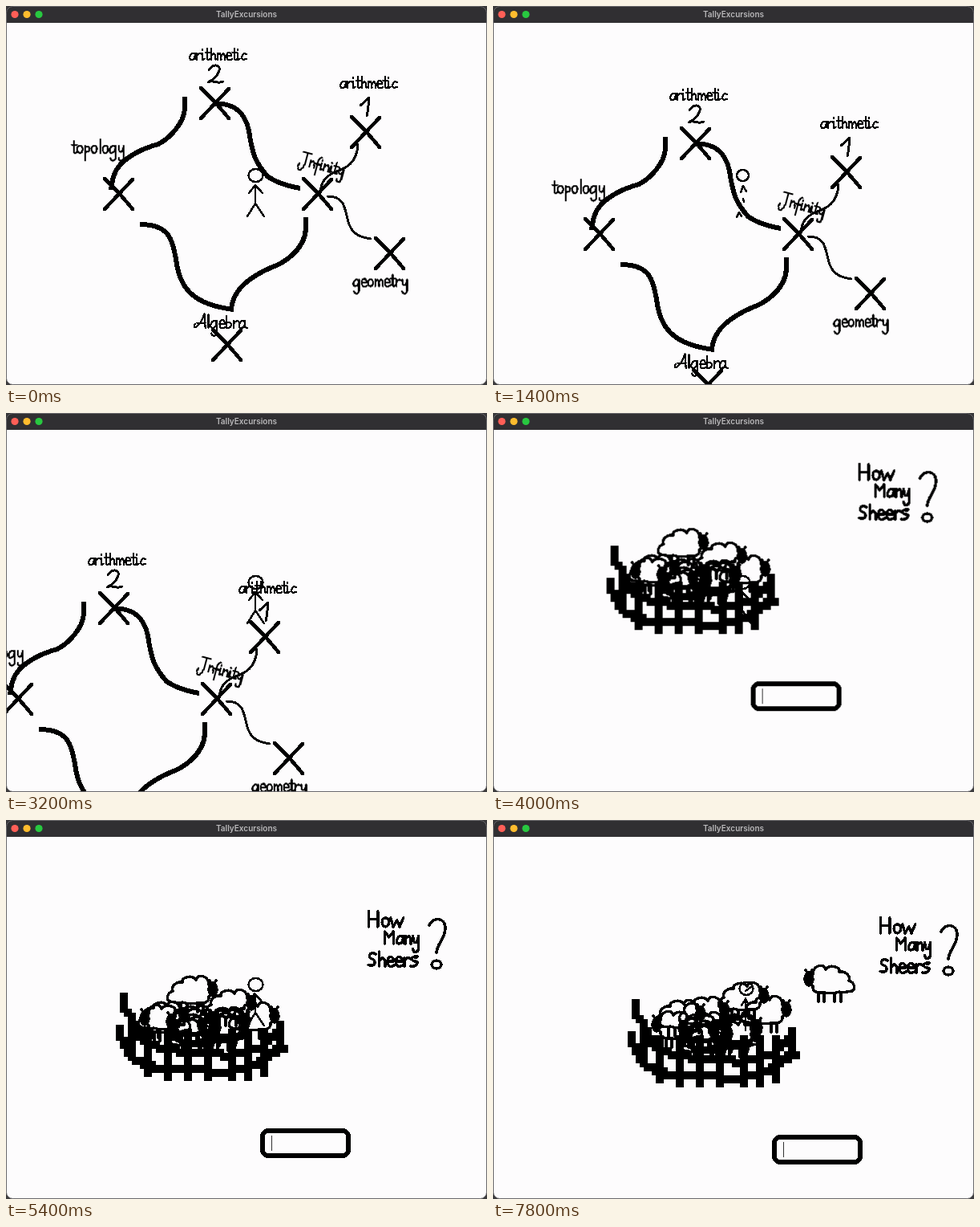
Write an HTML page that moves like this. It is 600 by 472 pixels and loops after 8000 ms.

```html
<!DOCTYPE html>
<html lang="en">
<head>
<meta charset="utf-8">
<title>TallyExcursions</title>
<style>
html, body { margin: 0; width: 100%; height: 100%; overflow: hidden; background: #3b3a3c; }
svg { display: block; width: 100%; height: 100%; }
.ink { fill: none; stroke: #000; stroke-linecap: round; stroke-linejoin: round; shape-rendering: crispEdges; }
.bar { font: 600 10px Inter, "Open Sans", sans-serif; fill: #b9b8ba; text-anchor: middle; }
.anim { animation: 8s step-end infinite; }
#map { animation-name: mapMove; }
#farm { animation-name: farmMove; }
#mapScene { animation-name: early; }
#farmScene { animation-name: late; }
#stand { animation-name: stand; }
#walk { animation-name: walk; }
#side { animation-name: side; }
#herdA { animation-name: herdA; }
#herdB { animation-name: herdB; }
#stray { animation-name: stray; }

@keyframes mapMove {
  0% { transform: translate(0, 0); animation-timing-function: steps(7); }
  17.5% { transform: translate(-8px, 50px); animation-timing-function: steps(2); }
  22.5% { transform: translate(9px, 75px); animation-timing-function: steps(5); }
  35% { transform: translate(-126px, 122px); }
  40% { transform: translate(-126px, 122px); animation-timing-function: steps(3); }
  47.5%, 100% { transform: translate(-126px, 95px); }
}
@keyframes farmMove {
  0%, 47.5% { transform: translate(2px, -6px); animation-timing-function: steps(5); }
  57.5% { transform: translate(0, 0); }
  60% { transform: translate(0, 0); }
  62.5% { transform: translate(28px, 15px); animation-timing-function: steps(2); }
  67.5% { transform: translate(-3px, 45px); }
  70% { transform: translate(-16px, 45px); animation-timing-function: steps(2); }
  75% { transform: translate(-3px, 45px); animation-timing-function: steps(3); }
  82.5% { transform: translate(-78px, 67px); animation-timing-function: steps(3); }
  90% { transform: translate(-47px, 88px); animation-timing-function: steps(3); }
  97.5%, 100% { transform: translate(28px, 53px); }
}
@keyframes early { 0% { visibility: visible; } 47.5%, 100% { visibility: hidden; } }
@keyframes late { 0% { visibility: hidden; } 47.5%, 100% { visibility: visible; } }
@keyframes stand {
  0% { opacity: 1; }
  12.5% { opacity: 0; }
  22.5% { opacity: 1; transform: none; }
  62.5% { opacity: 1; transform: translateY(-6px); }
  77.5%, 100% { opacity: 0; }
}
@keyframes walk { 0% { opacity: 0; } 12.5% { opacity: 1; } 22.5%, 100% { opacity: 0; } }
@keyframes side { 0% { opacity: 0; } 77.5%, 100% { opacity: 1; } }
@keyframes herdA { 0% { opacity: 1; } 90%, 100% { opacity: 0; } }
@keyframes herdB { 0% { opacity: 0; } 90%, 100% { opacity: 1; } }
@keyframes stray {
  0% { opacity: 0; transform: translate(361px, 133px); }
  77.5% { opacity: 1; transform: translate(361px, 133px); }
  90%, 100% { opacity: 1; transform: translate(360px, 126px); }
}
</style>
</head>
<body>
<svg viewBox="0 0 600 472" preserveAspectRatio="none">
  <defs>
    <g id="sheep" stroke-width="3.4">
      <path d="M11 13C12 0 26 0 27 7C32 0 46 4 44 10C52 9 58 15 56 21C64 24 64 32 60 34C55 34 50 37 44 35C36 38 28 36 24 36C16 37 10 34 11 28"/>
      <path d="M18 37v10M25 37v10M38 37v10M46 37v10M2 8l3 5M10 8l-3 5"/>
      <ellipse cx="6" cy="19" rx="5" ry="8" fill="#000"/>
    </g>
    <path id="cross" d="M-18-19Q0-2 17 19M17-18Q0 0-18 19" stroke-width="4.6"/>
  </defs>

  <rect x=".5" y="1" width="599" height="470.5" rx="8" fill="#fdfcfd"/>

  <g id="mapScene" class="ink anim">
    <g id="map" class="anim">
      <g stroke-width="6" stroke-linecap="butt">
        <path d="M223 113V128C222 146 204 165 190 172C165 179 150 190 143 197C134 207 133 215 131 229"/>
        <path d="M260 122C284 120 298 133 303 155C307 185 312 196 326 212C337 220 350 224 367 227"/>
        <path d="M167 272C205 272 207 292 212 315C216 350 232 372 284 378"/>
        <path d="M374 263V278C372 305 345 321 330 326C310 335 283 350 281 378"/>
      </g>
      <g stroke-width="3">
        <path d="M439 172C438 195 425 202 410 207C396 213 392 224 393 230"/>
        <path d="M401 237C425 237 422 255 428 272C434 287 445 288 455 290"/>
        <path d="M253 80C258 71 268 73 266 80C264 88 258 92 252 95C258 91 264 98 271 94M442 124L453 114C452 122 452 130 450 137"/>
      </g>
    </g>
  </g>

  <g id="farmScene" class="ink anim">
    <g id="farm" class="anim">
      <g id="herdA" class="anim"></g>
      <g id="herdB" class="anim"></g>
      <g id="flock"></g>
      <g id="stray" class="anim"><use href="#sheep"/></g>
      <path id="fence" fill="#000" stroke="none"/>
      <path d="M531 86C536 75 551 76 551 90C550 105 541 108 540 120M513 125h3" stroke-width="3.6"/>
      <ellipse cx="540" cy="135" rx="6" ry="5" stroke-width="3.4"/>
      <rect x="323" y="342" width="107" height="31" rx="7" stroke-width="6"/>
      <path d="M334.5 348v19" stroke="#333" stroke-width="1.5" stroke-linecap="butt"/>
    </g>
  </g>

  <g class="ink" stroke-width="2.5">
    <g id="stand" class="anim">
      <ellipse cx="311.5" cy="211" rx="9" ry="8"/>
      <path d="M311 223V246M303 233L311 223L320 233M301 262L311 246L322 262"/>
    </g>
    <g id="walk" class="anim">
      <ellipse cx="311.5" cy="211" rx="7.5" ry="7"/>
      <path d="M309 232L312 224L316 231M312 240l1 4M304 263l3-6l3 5"/>
    </g>
    <g id="side" class="anim">
      <ellipse cx="316" cy="210" rx="8.5" ry="8"/>
      <path d="M315 222V262M310 231L315 223L319 230M315 213L323 207"/>
    </g>
  </g>

  <path d="M0 21V8Q0 0 8 0H592Q600 0 600 8V21Z" fill="#302f32"/>
  <rect x=".5" y=".5" width="599" height="471" rx="8" fill="none" stroke="#6b6a6d"/>
  <circle cx="11" cy="10.5" r="4.6" fill="#ff5f57"/>
  <circle cx="26" cy="10.5" r="4.6" fill="#febc2e"/>
  <circle cx="41" cy="10.5" r="4.6" fill="#28c840"/>
  <text class="bar" x="300" y="14">TallyExcursions</text>
</svg>
<script>
const byId = id => document.getElementById(id);
const add = (id, markup) => byId(id).insertAdjacentHTML("beforeend", markup);

// Handwritten letters: advance width and pen strokes above the baseline.
const letters = {
  a: [7, "M6-6C1-10-2 0 2 0S6-5 6-7V-1L8 0"],
  b: [7, "M1-12V0C7 1 7-8 1-5"],
  c: [6, "M6-6C1-9 0 0 3 0L6-1"],
  e: [7, "M1-4H6C6-9 1-9 1-4S4 1 7-1"],
  f: [5, "M5-13C1-13 2-6 2 7M0-5H5"],
  g: [8, "M6-6C1-10-2 0 2 0S6-5 6-7V5C5 9 1 8 1 5"],
  h: [7, "M1-12V0M1-4C4-9 6-7 6 0"],
  i: [4, "M1-7V0L3-1M1-11v1"],
  l: [4, "M2-13V0"],
  m: [10, "M1-7V0M1-4C3-9 5-7 5 0M5-4C7-9 9-7 9 0"],
  n: [7, "M1-7V0M1-4C4-9 6-7 6 0"],
  o: [7, "M3-7C-1-7 0 0 3 0S7-7 3-7"],
  p: [7, "M1-7V7M1-5C6-10 8 0 1-1"],
  r: [6, "M1-7V0M1-4C3-8 5-7 6-6"],
  s: [6, "M5-7C0-9 0-4 4-4S5 1 0 0"],
  t: [5, "M2-12V-1Q3 1 5-1M0-8H5"],
  w: [10, "M0-7L2 0L5-5L7 0L10-7"],
  y: [8, "M1-7C1 1 5 1 6-7V5C5 9 1 8 1 5"],
  A: [11, "M0-4C-4 2 4 1 9-14L10 0M2-5H10"],
  H: [11, "M1-12V0M8-12V0M1-6H8"],
  I: [10, "M1-14H10M6-14C6-5 6 2 3 5S-2 2 0-1"],
  M: [12, "M1 0V-11L5-6L9-11V0"],
  S: [8, "M6-10C1-13-1-7 3-6S6 1 0-1"]
};

function write(id, word, x, y, scale, pen = 2.2, tilt = 0) {
  let left = 0, strokes = "";
  for (const ch of word) {
    const [width, path] = letters[ch];
    strokes += `<path transform="translate(${left})" d="${path}"/>`;
    left += width;
  }
  add(id, `<g aria-label="${word}" stroke-width="${pen / scale}" transform="translate(${x} ${y}) rotate(${tilt}) scale(${scale})">${strokes}</g>`);
}

write("map", "arithmetic", 229, 67, 1.16);
write("map", "arithmetic", 417, 102, 1.16);
write("map", "topology", 82, 183, 1.27);
write("map", "Infinity", 366, 197, 1.15, 2.2, 15);
write("map", "geometry", 433, 349, 1.2);
write("map", "Algebra", 236, 401, 1.27);
write("farm", "How", 454, 88, 1.6, 3.4);
write("farm", "Many", 474, 109, 1.36, 3.4);
write("farm", "Sheers", 455, 137, 1.5, 3.4);

for (const [x, y] of [[261, 121], [141, 234], [389, 234], [449, 157], [479, 308], [276, 422]])
  add("map", `<use href="#cross" x="${x}" y="${y}"/>`);

const putSheep = (id, x, y, right = true) =>
  add(id, `<use href="#sheep" transform="translate(${right ? x + 64 : x} ${y}) scale(${right ? -1 : 1} 1)"/>`);

for (const [x, y] of [[203, 147], [251, 164], [280, 180], [167, 179]]) putSheep("herdA", x, y);
for (const [x, y] of [[252, 147], [280, 164], [203, 165], [173, 169]]) putSheep("herdB", x, y);
for (let i = 0; i < 10; i++)
  putSheep("flock", 170 + i * 37 % 75, 183 + i * 11 % 19, i % 3 > 0);

// Fence: square blocks snapped to a coarse grid along each line.
function blocks(...points) {
  const snap = v => Math.round(v / 5) * 5 - 5;
  let path = "";
  for (let i = 1; i < points.length; i++) {
    const [x0, y0] = points[i - 1], [x1, y1] = points[i];
    const count = Math.ceil(Math.hypot(x1 - x0, y1 - y0) / 4);
    for (let k = 0; k <= count; k++) {
      const x = snap(x0 + (x1 - x0) * k / count), y = snap(y0 + (y1 - y0) * k / count);
      path += `M${x} ${y}h10v10h-10z`;
    }
  }
  return path;
}

let fence = blocks([148, 173], [152, 190], [164, 208], [170, 224], [188, 236], [230, 246], [285, 248], [322, 238], [346, 212])
  + blocks([145, 214], [148, 234], [164, 254], [182, 262], [230, 267], [285, 268], [322, 256], [348, 238])
  + blocks([160, 205], [160, 248]) + blocks([346, 212], [342, 244]);
for (const x of [180, 205, 230, 257, 286, 306, 327]) {
  const end = 278 - ((x - 262) / 18) ** 2 * .45;
  fence += blocks([x, 222], [x, Math.min(end, 276)]);
}
byId("fence").setAttribute("d", fence);
</script>
</body>
</html>
```
